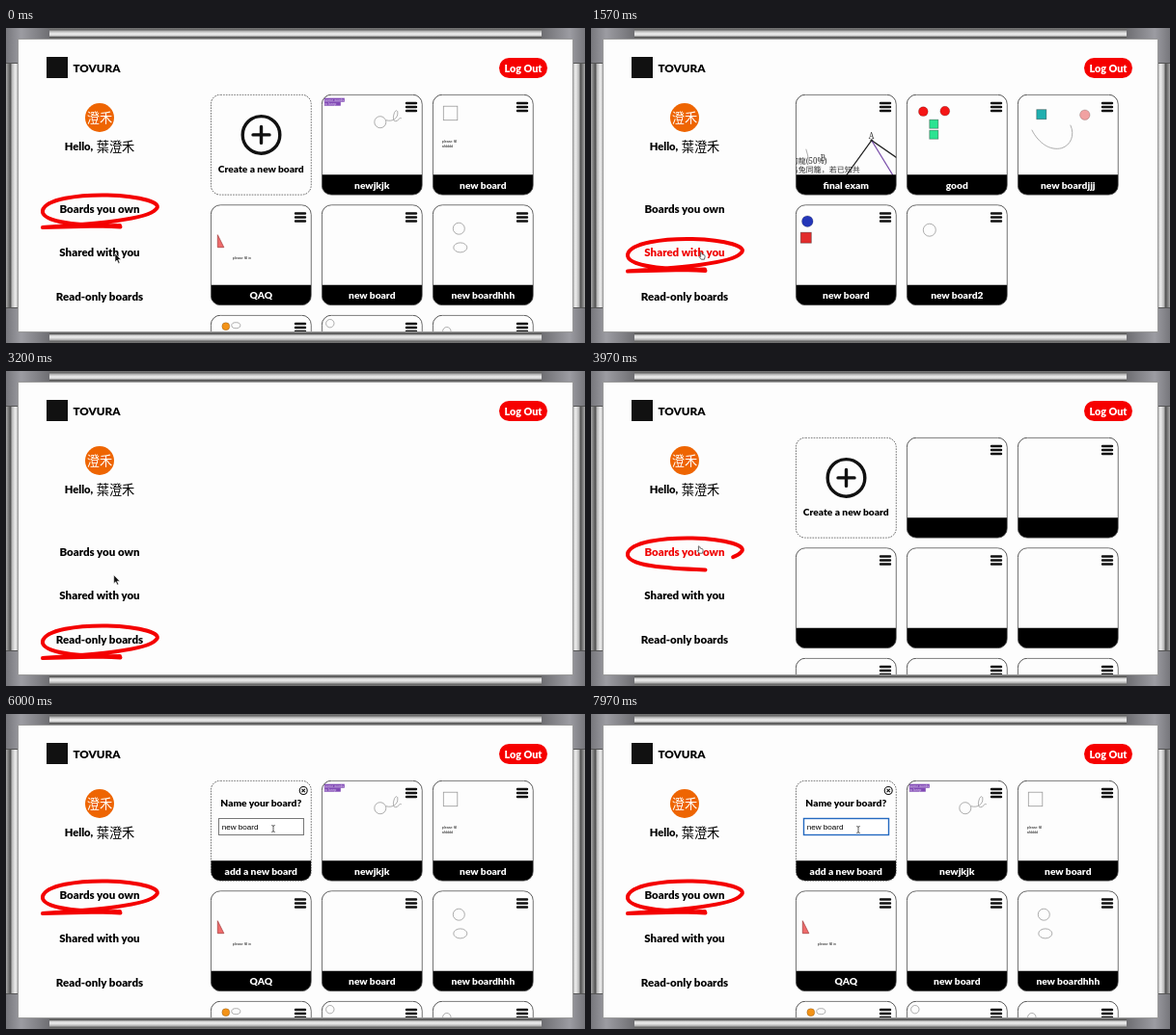
An HTML page for the animation above (8000 ms loop, 600 by 327 pixels).

```html
<!DOCTYPE html>
<html lang="en">
<head>
<meta charset="utf-8">
<style>
  html, body { margin: 0; width: 100%; height: 100%; overflow: hidden; background: #fff; }
  svg { display: block; }
  #stage { width: 100vw; height: 100vh; }
  text { font: 900 10.2px Lato, sans-serif; text-anchor: middle; }
  .link { font-size: 11.5px; }
  .cjk { font: 500 13.2px "Noto Sans CJK TC", "Noto Sans CJK", "Noto Sans CJK JP", sans-serif; }
  .tiny { font: 3.7px "Liberation Sans", sans-serif; text-anchor: start; }
  .serif { font: 8px "Noto Serif", serif; text-anchor: start; fill: #333; }
  .field { font: 8.1px "Liberation Sans", sans-serif; text-anchor: start; }
  .sketch { fill: none; stroke: #999; stroke-width: .8; }
  .menu { stroke: #111; stroke-width: 2.4; stroke-linecap: round; }
</style>
</head>
<body>
<svg id="stage" viewBox="0 0 600 327" preserveAspectRatio="none">
  <defs>
    <linearGradient id="rail" x2="0" y2="1">
      <stop stop-color="#777"/><stop offset=".15" stop-color="#666"/>
      <stop offset=".3" stop-color="#bbb"/><stop offset=".5" stop-color="#eee"/>
      <stop offset=".68" stop-color="#ccc"/><stop offset=".78" stop-color="#555"/>
      <stop offset="1" stop-color="#888"/>
    </linearGradient>
    <linearGradient id="post">
      <stop stop-color="#aaa"/><stop offset=".2" stop-color="#777"/>
      <stop offset=".35" stop-color="#555"/><stop offset=".5" stop-color="#bbb"/>
      <stop offset=".75" stop-color="#eee"/><stop offset="1" stop-color="#aaa"/>
    </linearGradient>
    <linearGradient id="corner">
      <stop stop-color="#77777c"/><stop offset=".35" stop-color="#9c9ca2"/><stop offset="1" stop-color="#6e6e72"/>
    </linearGradient>
    <clipPath id="board"><rect x="13" y="12" width="574" height="303"/></clipPath>
    <clipPath id="cardShape"><rect x=".5" y=".5" width="104" height="104" rx="10"/></clipPath>
  </defs>
  <g id="frame"></g>
  <rect x="12.5" y="11.5" width="575" height="304" fill="#fdfdfd" stroke="#999"/>

  <rect x="42" y="30" width="22" height="22" fill="#111"/>
  <text x="94" y="46" style="font-size:11.7px">TOVURA</text>
  <rect x="511" y="31" width="50" height="21" rx="10.5" fill="#f60000"/>
  <text x="536" y="45.5" fill="#fff" style="font-size:10.8px">Log Out</text>
  <circle cx="97" cy="93" r="15" fill="#ee6502"/>
  <text class="cjk" x="97" y="98" fill="#fff">澄禾</text>
  <text x="75.5" y="127" style="font-size:11.2px">Hello,</text>
  <text class="cjk" x="113.5" y="127.5">葉澄禾</text>

  <g id="links"></g>
  <path id="scribble" pathLength="1" stroke-dasharray="1 2" fill="none" stroke="#f40000"
    stroke-width="4" stroke-linecap="round" stroke-linejoin="round"
    d="M118.5 19C80 17.5 36 15 38 2C41-10 75-14.5 105-14C140-13 164-6 155 1C146 12 85 16 38 19.5L118 17.5"/>
  <g id="views" clip-path="url(#board)"></g>
  <g id="cursor"></g>
</svg>

<script>
const $ = id => document.getElementById(id);
const LOOP = 8000, DRAW = 500, LOAD = 400;
const COLS = [211.8, 326.8, 441.8], ROWS = [68.7, 183.2, 297.7];
const RED = '#f00000';

// Whiteboard frame, mirrored left to right and top to bottom
const rect = (x, y, w, h, fill) => `<rect x="${x}" y="${y}" width="${w}" height="${h}" fill="${fill}"/>`;
const flip = (transform, body) => body + `<g transform="${transform}">${body}</g>`;
$('frame').innerHTML =
  flip('matrix(1 0 0 -1 0 327)', rect(0, 0, 600, 12, 'url(#rail)')) +
  flip('matrix(-1 0 0 1 600 0)', rect(0, 12, 13, 303, 'url(#post)') +
    flip('matrix(1 0 0 -1 0 327)', rect(0, 0, 45, 37, 'url(#corner)') +
      '<path d="M0 36.5h45" stroke="#555"/>'));

// Sidebar links
const links = [
  { label: 'Boards you own', y: 187.5 },
  { label: 'Shared with you', y: 233 },
  { label: 'Read-only boards', y: 278.5 },
];
$('links').innerHTML = links.map(l => `<text class="link" x="97" y="${l.y + 4}">${l.label}</text>`).join('');

// Card drawings use coordinates local to each 105 px card
const circle = (x, y, r, fill) =>
  `<circle cx="${x}" cy="${y}" r="${r}" ${fill ? `fill="${fill}" stroke="#0005" stroke-width=".6"` : 'class="sketch"'}/>`;
const square = (x, y, size, fill) =>
  `<rect x="${x}" y="${y}" width="${size}" height="${size}" ${fill ? `fill="${fill}" stroke="#0006" stroke-width=".8"` : 'class="sketch"'}/>`;
const oval = (x, y, rx, ry) => `<ellipse cx="${x}" cy="${y}" rx="${rx}" ry="${ry}" class="sketch"/>`;
const curve = d => `<path d="${d}" class="sketch"/>`;
const tiny = (x, y, s, fill = '#111') => `<text class="tiny" x="${x}" y="${y}" fill="${fill}">${s}</text>`;
const serif = (x, y, s) => `<text class="serif" x="${x}" y="${y}">${s}</text>`;
const line = (d, color) => `<path d="${d}" fill="none" stroke="${color}" stroke-width="1.2"/>`;

const footer = '<path d="M.5 83.5h104v21H.5z" clip-path="url(#cardShape)"/>';
const outline = dash =>
  `<rect x=".5" y=".5" width="104" height="104" rx="10" fill="none" stroke="#444" stroke-width=".9" ${dash ? 'stroke-dasharray="1.6 1.2"' : ''}/>`;
const title = s => `<text x="52.5" y="98" fill="#fff">${s}</text>`;
const place = (slot, body) =>
  `<svg x="${COLS[slot % 3]}" y="${ROWS[slot / 3 | 0]}" width="105" height="105">${body}</svg>`;
const card = (slot, name, art = '') => place(slot,
  `<g class="loaded"><g clip-path="url(#cardShape)">${art}</g></g>${footer}${outline()}
   <path class="menu" d="M88.2 9.3h10M88.2 13.3h10M88.2 17.3h10"/><g class="loaded">${title(name)}</g>`);

const createCard = place(0, `
  <g id="create">${outline(true)}
    <g id="plus" fill="none" stroke="#111" stroke-width="3.4" stroke-linecap="round">
      <circle cx="52.7" cy="42.2" r="19.3"/><path d="M44.2 42.2h17M52.7 33.7v17"/></g>
    <text id="createText" x="52.5" y="81.2">Create a new board</text></g>
  <g id="form">${footer}${outline(true)}
    <g fill="none" stroke="#111" stroke-width="1.1"><circle cx="96.4" cy="10.8" r="4"/>
      <path d="M94.7 9.1l3.4 3.4m0-3.4l-3.4 3.4"/></g>
    <text x="52.5" y="27.7">Name your board?</text>
    <rect id="input" x="8.7" y="39.8" width="88" height="17" fill="#fff"/>
    <text class="field" x="11.9" y="51">new board</text>${title('add a new board')}</g>`);

const views = [
  createCard +
  card(1, 'newjkjk', rect(3, 4, 21, 4, '#8149b5') + rect(3, 8, 17, 4, '#8149b5') +
    tiny(3.4, 7.2, 'some words', '#e6d9f4') + tiny(3.4, 11, 'to keep', '#e6d9f4') +
    circle(61, 29, 6) + curve('M67 27C74 29 80 25 79 18C76 13 72 29 77 28S79 24 83 25')) +
  card(2, 'new board', square(11.5, 12.5, 14.5) + tiny(10, 50, 'please fill') + tiny(10, 55, 'afdddd')) +
  card(3, 'QAQ', '<path d="M7.5 31.5v13h6.5z" fill="#ef6b6b" stroke="#a44" stroke-width=".8"/>' +
    tiny(23, 57, 'please fill in')) +
  card(4, 'new board') +
  card(5, 'new boardhhh', circle(27.5, 25, 6) + oval(29, 44.7, 7, 5)) +
  card(6, '', circle(16, 12, 4, '#f39318') + oval(26.5, 11, 4.5, 3)) +
  card(7, '', circle(9, 9, 4.2)) +
  card(8, '', circle(15, 17, 4.2)),

  card(0, 'final exam',
    serif(76, 46, 'A') + serif(26, 69, 'B') + serif(-5, 72, '初龍(50%)') + serif(-5, 81, '鳥兔同籠，若已知共') +
    curve('M11 57Q13 62 14 72') + line('M53 84L79 48L105 66', '#222') + line('M79 48L101 84', '#7446a6') +
    circle(79, 48, 1.2, '#333')) +
  card(1, 'good', circle(17.5, 18, 4.9, '#f51616') + circle(40, 17.5, 4.9, '#f51616') +
    square(24, 26.5, 9, '#2be391') + square(24, 37.5, 9, '#2be391')) +
  card(2, 'new boardjjj', square(20, 16, 10, '#20afaf') + circle(70, 21.5, 5.2, '#f1a1a1') +
    curve('M15 37C22 51 34 59 46 56C55 53 60 43 55 32')) +
  card(3, 'new board', circle(12.5, 17.5, 5.8, '#2436b8') + square(5.5, 29, 11, '#e22d2d')) +
  card(4, 'new board2', circle(24, 26.5, 6.5)),

  '',
];
$('views').innerHTML = views.map(v => `<g>${v}</g>`).join('');
const viewNodes = [...$('views').children];
const linkNodes = [...$('links').children];
const loadedNodes = [...document.querySelectorAll('.loaded')];

// Timeline: clicks on links, then pointer positions
const clicks = [
  { at: -1000, view: 0 }, { at: 842, view: 1 }, { at: 2700, view: 2 }, { at: 3700, view: 0 },
];
const FORM_AT = 5400, FOCUS_AT = 6700;
const pointer = [
  [0, 115, 239], [300, 115, 237], [1900, 115, 237], [2300, 115, 274], [2900, 115, 274],
  [3400, 113, 186], [4200, 113, 186], [4900, 280, 104], [5300, 280, 104], [5900, 277, 119], [8000, 277, 120],
];
const shapes = {
  arrow: '<path d="M-2-5v9l2-2 1.5 3.4 1.5-.7L1.5 1.5H4.3z" fill="#111" stroke="#fff" stroke-width=".6"/>',
  hand: '<path d="M-1.7-4q.8-.8 1.4.4l.5 1.6 2 .6q1.2.4.9 1.8l-.6 2.8H-.7L-2.8.7q0-1.2 1.5-.2z" fill="#fff" stroke="#444" stroke-width=".8"/>',
  beam: '<path d="M-1.7-3.5q1.7 0 1.7 1.2q0-1.2 1.7-1.2M0-2.5v5M-1.7 3.5q1.7 0 1.7-1.2q0 1.2 1.7 1.2" fill="none" stroke="#333" stroke-width=".8"/>',
};

const show = (node, on) => node.style.display = on ? '' : 'none';
const clamp = v => Math.max(0, Math.min(1, v));

function pointerAt(t) {
  const i = pointer.findIndex(p => p[0] > t);
  const [t0, x0, y0] = pointer[i - 1], [t1, x1, y1] = pointer[i];
  const u = (t - t0) / (t1 - t0), e = u * u * (3 - 2 * u);
  return [x0 + (x1 - x0) * e, y0 + (y1 - y0) * e];
}

function render(t) {
  const click = clicks.filter(c => c.at <= t).pop();
  const age = t - click.at;
  viewNodes.forEach((node, i) => show(node, i === click.view));
  loadedNodes.forEach(node => show(node, age >= LOAD));
  $('scribble').setAttribute('transform', `translate(0 ${links[click.view].y})`);
  $('scribble').setAttribute('stroke-dashoffset', 1 - clamp(age / DRAW));

  const [x, y] = pointerAt(t);
  const formOpen = t >= FORM_AT;
  const hovered = links.findIndex(l => t > 25 && x > 51 && x < 143 && Math.abs(y - l.y) < 10);
  const onCreate = !formOpen && click.view === 0 && x > 212 && x < 317 && y > 69 && y < 174;
  linkNodes.forEach((node, i) => node.setAttribute('fill', i === hovered ? RED : '#000'));
  $('plus').setAttribute('stroke', onCreate ? RED : '#111');
  $('createText').setAttribute('fill', onCreate ? RED : '#000');
  show($('create'), !formOpen);
  show($('form'), formOpen);
  const focused = t >= FOCUS_AT;
  $('input').setAttribute('stroke', focused ? '#2469c0' : '#777');
  $('input').setAttribute('stroke-width', focused ? 1.4 : 1);

  const overInput = formOpen && y > 108;
  $('cursor').innerHTML = shapes[overInput ? 'beam' : hovered >= 0 || onCreate ? 'hand' : 'arrow'];
  $('cursor').setAttribute('transform', `translate(${x} ${y})`);
}

function tick() {
  render(performance.now() % LOOP);
  requestAnimationFrame(tick);
}
tick();
</script>
</body>
</html>
```
